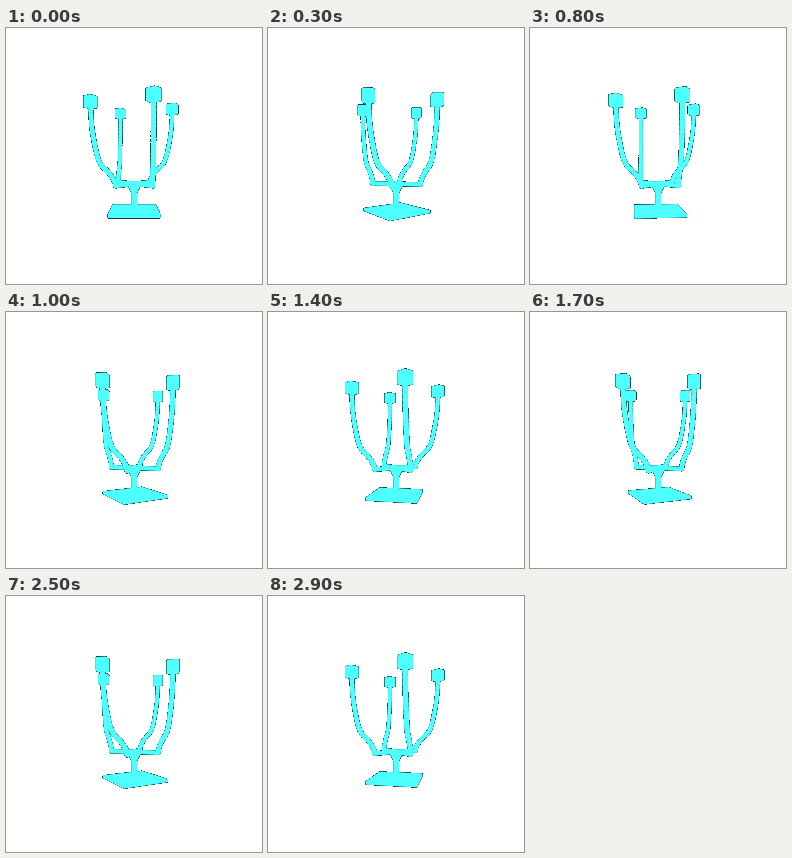
An HTML page with a canvas that plays this animation: 256 by 256 pixels, repeating every 3000 ms.

```html
<!DOCTYPE html>
<html lang="en">
<head>
<meta charset="utf-8">
<title>Turning candelabra</title>
<style>
  html, body { margin: 0; width: 100%; height: 100%; overflow: hidden; background: #fff; }
  canvas { display: block; width: 256px; height: 256px; }
</style>
</head>
<body>
<canvas id="stage" width="256" height="256"></canvas>
<script>
const SIZE = 256, LOOP = 3000, STEP = 100;
const CYAN = [77, 255, 255];
const CENTER_X = 128.2, HORIZON = 131;
const DISTANCE = 5.25, UNIT = 44.2;      // pixels per unit at the turning axis
const ARM_WIDTH = 4.5;
const CUP = { reach: 0.917, radius: 0.149, top: -58.4, bottom: -48 };
const BASE = { half: 0.54, top: 50, bottom: 53.1 };
const RAD = Math.PI / 180;

// Arm centre line: distance along its plane, height in pixels below the horizon.
const PROFILE = [
  [0.917, -48], [0.895, -31], [0.84, -15.5], [0.765, -1], [0.68, 6.5],
  [0.57, 11], [0.46, 17], [0.405, 21.5], [0.39, 25]
];
// Each arm lies in a nearly straight plane beside the axis.
const armOffset = reach => 0.387 - 0.045 * (reach - 0.39);

const ctx = document.getElementById('stage').getContext('2d', { willReadFrequently: true });
let turn = 0;

function project(x, y, z) {
  const c = Math.cos(turn), s = Math.sin(turn);
  const scale = DISTANCE / (DISTANCE - (z * c - x * s));
  return { x: CENTER_X + UNIT * (x * c + z * s) * scale, y: HORIZON + y * scale, scale };
}

function spline(a, b, c, d, t) {
  return b + 0.5 * t * (c - a + t * (2 * a - 5 * b + 4 * c - d + t * (3 * (b - c) + d - a)));
}

function smooth(points, steps) {
  const at = i => points[Math.max(0, Math.min(points.length - 1, i))];
  const out = [];
  for (let i = 0; i < points.length - 1; i++) {
    for (let k = 0; k < steps; k++) {
      out.push([0, 1].map(n =>
        spline(at(i - 1)[n], at(i)[n], at(i + 1)[n], at(i + 2)[n], k / steps)));
    }
  }
  return out.concat([at(points.length - 1)]);
}

const armCurve = smooth(PROFILE, 4);

function fillShape(points) {
  ctx.beginPath();
  points.forEach(p => ctx.lineTo(p.x, p.y));
  ctx.fill();
}

function halfHull(points) {
  const hull = [];
  for (const p of points) {
    while (hull.length > 1) {
      const a = hull[hull.length - 2], b = hull[hull.length - 1];
      if ((b.x - a.x) * (p.y - a.y) - (b.y - a.y) * (p.x - a.x) > 0) break;
      hull.pop();
    }
    hull.push(p);
  }
  return hull.slice(0, -1);
}

// Silhouette of an upright prism with its corners at the given angles.
function drawPrism(x, z, radius, angles, top, bottom) {
  const points = [];
  for (const a of angles) {
    for (const y of [top, bottom]) {
      points.push(project(x + radius * Math.sin(a), y, z + radius * Math.cos(a)));
    }
  }
  points.sort((a, b) => a.x - b.x || a.y - b.y);
  fillShape([...halfHull(points), ...halfHull(points.reverse())]);
}

const quarters = [0, 90, 180, 270];
const baseCorners = quarters.map(q => (q + 45) * RAD);
// A square with cut corners, set askew to the base.
const cupCorners = quarters.flatMap(q => [q - 69.5, q]).map(a => a * RAD);

function drawTube(points, width) {
  for (let i = 1; i < points.length; i++) {
    const a = points[i - 1], b = points[i];
    ctx.lineWidth = width * (a.scale + b.scale) / 2;
    ctx.beginPath();
    ctx.moveTo(a.x, a.y);
    ctx.lineTo(b.x, b.y);
    ctx.stroke();
  }
}

function drawArm(angle) {
  const c = Math.round(Math.cos(angle)), s = Math.round(Math.sin(angle));
  const place = reach => {
    const x = armOffset(reach);
    return [x * c + reach * s, reach * c - x * s];
  };
  const tube = armCurve.map(([reach, y]) => {
    const [x, z] = place(reach);
    return project(x, y, z);
  });
  drawTube([...tube, project(0, 24.7, 0)], ARM_WIDTH);
  drawPrism(...place(CUP.reach), CUP.radius, cupCorners, CUP.top, CUP.bottom);
}

function drawStem() {
  const outline = [[6.5, 22.5], [6.5, 27], [4.5, 30.5], [3, 34], [3, 50]];
  const side = sign => outline.map(([w, y]) => ({ x: CENTER_X + sign * w, y: HORIZON + y }));
  fillShape([...side(-1), ...side(1).reverse()]);
}

// Hard silhouette whose partly covered pixels fade to black.
function hardenEdges() {
  const image = ctx.getImageData(0, 0, SIZE, SIZE), d = image.data;
  for (let i = 0; i < d.length; i += 4) {
    const cover = d[i + 3] / 255;
    for (let n = 0; n < 3; n++) d[i + n] = cover > 0.2 ? CYAN[n] * cover : 255;
    d[i + 3] = 255;
  }
  ctx.putImageData(image, 0, 0);
}

function draw(time) {
  turn = Math.floor((time % LOOP) / STEP) * STEP / LOOP * 2 * Math.PI;
  ctx.clearRect(0, 0, SIZE, SIZE);
  ctx.fillStyle = ctx.strokeStyle = `rgb(${CYAN})`;
  ctx.lineCap = 'round';
  drawPrism(0, 0, BASE.half * Math.SQRT2, baseCorners, BASE.top, BASE.bottom);
  drawStem();
  quarters.forEach(q => drawArm(q * RAD));
  hardenEdges();
}

const start = performance.now();
function tick() {
  draw(performance.now() - start);
  requestAnimationFrame(tick);
}
tick();
</script>
</body>
</html>
```
